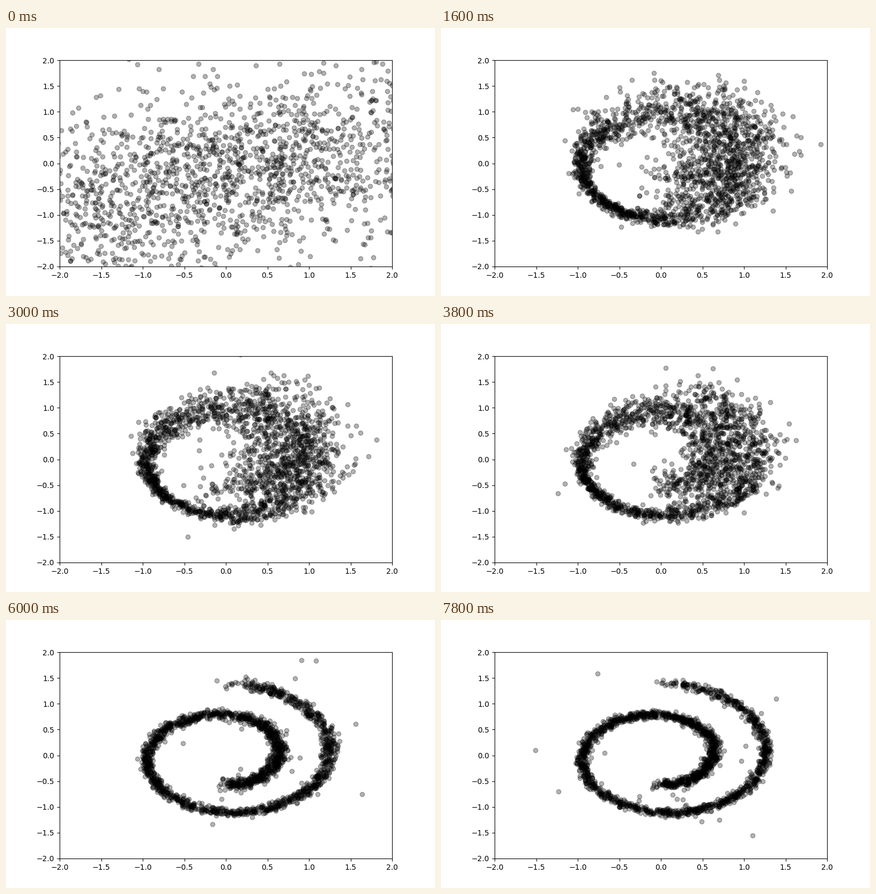
A matplotlib script for the animation above (8000 ms loop, 800 px wide and 500 px high).

```python
import numpy as np
import matplotlib.pyplot as plt
from matplotlib.animation import FuncAnimation

COUNT = 2000
FRAMES = 40
INTERVAL = 200


def bump(x, center, width):
    return np.exp(-((x - center) / width) ** 2)


def cloud(rng):
    """Broad, slightly tilted normal cloud."""
    x = rng.normal(0, 1.7, COUNT)
    y = 0.3 * x - 0.25 + rng.normal(0, 0.95, COUNT)
    return np.column_stack([x, y])


def spiral(rng, blur):
    """Noisy spiral; blur 1 smears its two right-hand arms together."""
    turn = rng.uniform(0.25 * blur, 5.92 - 0.12 * blur, COUNT)  # quarter turns
    turn += rng.normal(0, 0.07, COUNT)
    angle = (turn - 1) * np.pi / 2

    radius = 0.15 * np.pi + 0.05 * np.pi * turn + 0.09 * bump(turn, 0, 0.5)
    radius += blur * (0.27 * bump(turn, 1.8, 0.7) - 0.25 * bump(turn, 5, 0.7))

    # The left and lower arc settles first and stays narrow throughout.
    spread = 0.04 + 0.28 * blur * (1 - bump(turn, 3.4, 1.25))
    points = np.column_stack([np.cos(angle), np.sin(angle)]) * radius[:, None]
    return points + rng.normal(size=(COUNT, 2)) * spread[:, None]


def sample(frame):
    rng = np.random.default_rng(700 + frame)
    share = np.exp(-frame / 1.5)
    blur = 1 / (1 + np.exp((frame - 20) / 3))
    points = (1 - share) * spiral(rng, blur) + share * cloud(rng)
    stray = rng.random(COUNT) < 0.01 + 0.5 * share * (1 - share)
    points[stray] += rng.normal(0, 0.45, (stray.sum(), 2))
    return points


fig, ax = plt.subplots(figsize=(8, 5), dpi=100)
ax.set_xlim(-2, 2)
ax.set_ylim(-2, 2)
dots = ax.scatter(*sample(0).T, color="black", alpha=0.3)


def draw(frame):
    dots.set_offsets(sample(frame))
    return (dots,)


anim = FuncAnimation(fig, draw, frames=FRAMES, interval=INTERVAL,
                     repeat=True, repeat_delay=0)
plt.show()
```
